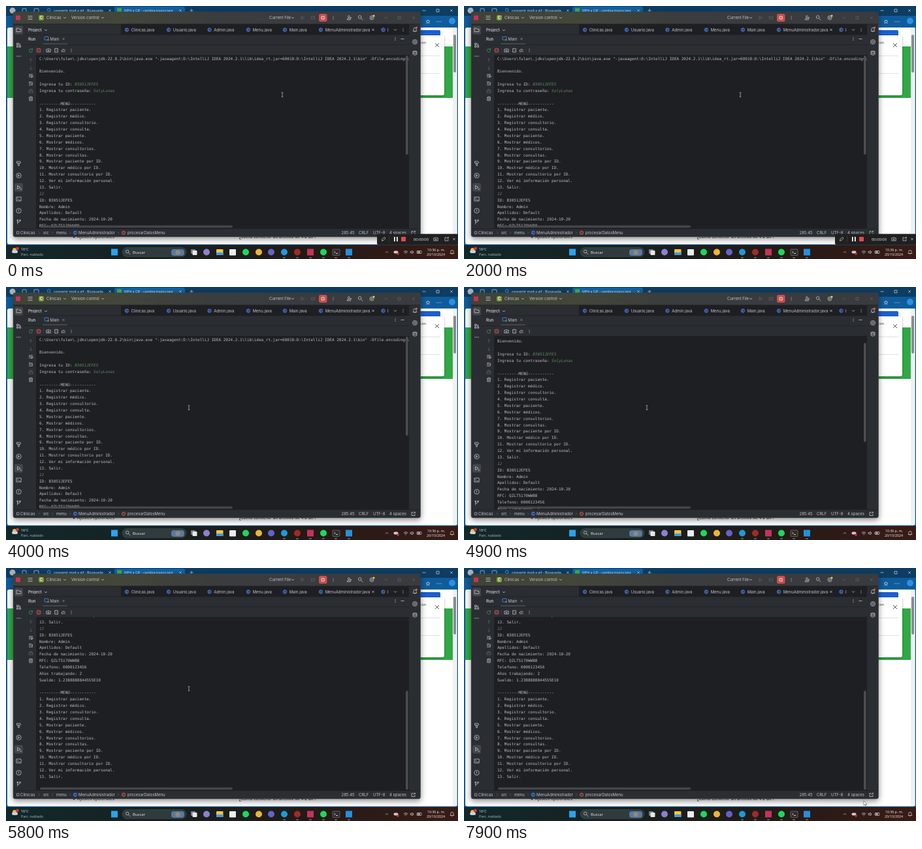
Animation, 692 px wide and 388 px high, one loop 8200 ms. Source, as an HTML page:

```html
<!DOCTYPE html>
<html lang="es">
<head>
<meta charset="utf-8">
<title>Consola</title>
<style>
html, body { margin: 0; width: 100%; height: 100%; overflow: hidden; background: #1e1f22 }
svg { display: block }
text { white-space: pre; font: 6px Inter, sans-serif; fill: #c3c5cb }
.web { font: 5.3px "Open Sans", sans-serif; fill: #eef3f8 }
.mono { font: 6px "DejaVu Sans Mono", monospace; fill: #bcbec4 }
.input { fill: #5b8f60; font-style: italic }
.bold { font-weight: 600 }
</style>
</head>
<body>
<svg id="stage" width="100%" height="100%" viewBox="0 0 692 388"></svg>
<script>
const LOOP = 8200, LINE = 9.87;
const GREY = '#c3c5cb', DIM = '#5f6269', BLUE = '#548af7', RED = '#db5c5c', GREEN = '#57965c';

const rect = (x, y, w, h, fill, r = 0, more = '') =>
  `<rect x="${x}" y="${y}" width="${w}" height="${h}" rx="${r}" fill="${fill}" ${more}/>`;
const dot = (x, y, r, fill) => `<circle cx="${x}" cy="${y}" r="${r}" fill="${fill}"/>`;
const ring = (x, y, r, stroke = GREY) =>
  `<circle cx="${x}" cy="${y}" r="${r}" fill="none" stroke="${stroke}" stroke-width=".8"/>`;
const text = (x, y, s, cls = '', more = '') => `<text x="${x}" y="${y}" class="${cls}" ${more}>${s}</text>`;
// Line icon centred on x, y
const icon = (x, y, d, stroke = GREY, fill = 'none') =>
  `<path transform="translate(${x} ${y})" d="${d}" stroke="${stroke}" fill="${fill}" stroke-width=".8"/>`;

const shape = {
  down: 'M-2-1L0 1L2-1', up: 'M-2 1L0-1L2 1', next: 'M-.8-1.6L.8 0L-.8 1.6',
  close: 'M-1.6-1.6L1.6 1.6M1.6-1.6L-1.6 1.6', minus: 'M-2.5 0H2.5', plus: 'M-2.5 0H2.5M0-2.5V2.5',
  box: 'M-2-2H2V2H-2Z', play: 'M-2-2.7L2.5 0L-2 2.7Z',
  folder: 'M-3.5-2.5H-.8L.4-1.3H3.5V2.7H-3.5Z', menu: 'M-3.5-2.5H3.5M-3.5 0H3.5M-3.5 2.5H3.5',
  search: 'M1-1A2.3 2.3 0 1 1-3.6-1A2.3 2.3 0 1 1 1-1M.4 .7L3.3 3.6',
  camera: 'M-3.2-1.8H-1.5L-.8-2.6H.8L1.5-1.8H3.2V2.4H-3.2ZM-1 .3A1 1 0 1 1 1 .3A1 1 0 1 1-1 .3',
  rerun: 'M2.3-1A2.6 2.6 0 1 0 2.5 1M2.6-2.8V-.8H.6', upArrow: 'M0 2.5V-2.5M-1.7-.8L0-2.5L1.7-.8',
  downArrow: 'M0-2.5V2.5M-1.7.8L0 2.5L1.7.8', wrap: 'M-3-2H3M-3 0H2Q3.5 0 3.5 1T2 2H0M1 1L0 2L1 3M-3 2H-1.5',
  toEnd: 'M-3-2H1M-3 0H0M-3 2.5H3M2-2V1M.8 0L2 1L3.2 0',
  printer: 'M-3-1H3V2H-3ZM-1.7-1V-3H1.7V-1', trash: 'M-3-2H3M-2.2-2V3H2.2V-2M-.9-3H.9M-.7-.5V1.5M.7-.5V1.5',
  tree: 'M-3-3H-.5V-.5H-3ZM.8 1H3V3.2H.8ZM-3 1H-.8V3.2H-3ZM-.5-1.7H2V1',
  hammer: 'M-3-2.7H2L3.4-1L2 0H-3ZM-.9 0V3.8H.9V0', shell: 'M-3.6-3H3.6V3H-3.6ZM-2-1.3L-.7 0L-2 1.3M.3 1.5H2',
  branch: 'M-1.8-2V3.5M2-2Q2 .8-1.8 1M-2.6-3H-1V-1.7H-2.6ZM1.2-3H2.8V-1.7H1.2Z',
  bell: 'M-3 2H3L2.1.8V-1A2.1 2.1 0 0 0-2.1-1V.8ZM-.7 3H.7',
  db: 'M-3-2.2Q0-4.4 3-2.2V2.2Q0 4.4-3 2.2ZM-3-2.2Q0-.2 3-2.2M-3 0Q0 2 3 0',
  person: 'M-1.6-1.6A1.5 1.5 0 1 1 1.4-1.6A1.5 1.5 0 1 1-1.6-1.6M-3 3Q-3 .8 0 .8T2.5 3ZM2 0H4M3-1V1',
  star: 'M0-3L.9-1H3L1.3.4L2 2.6L0 1.3L-2 2.6L-1.3.4L-3-1H-.9Z',
  wifi: 'M-3.2-1Q0-4 3.2-1M-2 .5Q0-1.3 2 .5M-.5 2H.5', sound: 'M-3-1H-1.5L0-2.5V2.5L-1.5 1H-3ZM1.3-1.5Q2.6 0 1.3 1.5',
  pen: 'M-2.6 2.6L-2-.1L1.5-3L3-1.5L.1 2Z', export: 'M0-2.5H-2.5V2.5H2.5V0M0 0L2.8-2.8M1-2.8H2.8V-1'
};
const at = (name, x, y, color, fill) => icon(x, y, shape[name], color, fill);
const dots = (x, y) => [-2, 0, 2].map(d => dot(x, y + d, .6, GREY)).join('');
const javaClass = (x, y) => dot(x, y, 2.9, '#25324d') + ring(x, y, 2.7, BLUE) + icon(x, y, 'M1-1A1.4 1.4 0 1 0 1 1', BLUE);

const browser = () => [
  rect(0, 0, 692, 388, '#0b5c9e'), rect(0, 0, 692, 15, '#0d3d63'),
  rect(166, 1, 108, 15, '#0f62a6', 3), rect(2, 15, 690, 18, '#0f5c9c'),
  dot(10, 7, 4.5, '#aeb4bb'), rect(25, 4, 6, 6, 'none', 1, `stroke="${GREY}" stroke-width=".8"`),
  rect(43, 4, 7, 6, 'none', 1, `stroke="${GREY}" stroke-width=".8"`), at('search', 67, 7, '#4da3ff'),
  text(73, 9, 'convertir mp4 a gif - Búsqueda', 'web'), at('close', 159, 7),
  rect(170, 3.5, 7, 7, '#3fae49'), text(181, 9, 'MP4 a GIF - cambia-trazos.test', 'web'), at('close', 267, 7),
  at('plus', 284, 7), at('minus', 640, 7), at('box', 661, 7), at('close', 682, 7),
  at('star', 646, 24), dot(660, 24, .7, GREY), dot(663, 24, .7, GREY), dot(666, 24, .7, GREY), dot(683, 23, 5, '#2f8fe0'),
  rect(2, 33, 688.5, 332.5, '#fff', 3), rect(2, 62, 682, 79, '#31a846'),
  rect(626, 37, 39, 10, '#1b5fd0', 2), rect(626, 45, 45, 92, '#fff', 3, 'filter="url(#soft)"'),
  text(634, 58, 'con', 'web', 'style="fill:#333"'), icon(660, 60, 'M-3-3L3 3M3-3L-3 3', '#333'),
  rect(634, 76, 31, .8, '#d8d8d8'), rect(634, 103, 31, .8, '#d8d8d8'),
  rect(684, 33, 6.5, 332, '#f1f1f1'), rect(685, 44, 4, 58, '#8b8b8b', 2),
  dot(104, 354, 1.5, '#222'),
  text(109, 356, 'Ajustes opcionales', 'web', 'style="fill:#222;font-size:6.6px"'),
  text(357, 356, '¿Cómo convertir un archivo MP4 a GIF?', 'web', 'style="fill:#222;font-size:6.3px;font-weight:600"')
].join('');

const tabs = [[185, 'Clinicas'], [249, 'Usuario'], [311.5, 'Admin'], [371, 'Menu'], [427, 'Main'], [482, 'MenuAdministrador']];
const ide = () => [
  rect(11, 9, 623.5, 345, '#2b2d30', 3, 'stroke="#45474b" stroke-width=".6" filter="url(#shadow)"'),
  rect(11.3, 9.3, 623, 18.2, 'url(#tint)', 2.5),
  rect(15, 14.5, 7, 7, '#c2345c'), at('menu', 37, 18),
  rect(50, 14, 8, 8, '#7a9a3d', 2), text(54, 20.2, 'C', 'bold', 'text-anchor="middle" style="fill:#fff"'),
  text(62, 20.2, 'Clinicas'), at('down', 90, 18), text(100, 20.2, 'Version control'), at('down', 148, 18),
  text(403, 20.2, 'Current File'), at('down', 439, 18), at('play', 454, 18, DIM),
  ring(470, 18, 2.2, DIM), icon(470, 18, 'M-3.5-2L-2-1M3.5-2L2-1M-3.5 2L-2 1M3.5 2L2 1', DIM),
  rect(479, 12, 12.5, 12, '#c94f4f', 2.5), at('box', 485.2, 18, '#fff'), dots(501, 18),
  at('person', 525, 18), at('search', 543, 18), ring(560, 18, 3), ring(560, 18, 1.1), dot(563, 15, 1.6, '#f2c55c'),
  at('minus', 582, 18, DIM), at('box', 602, 18, DIM), at('close', 624, 18, DIM),
  // Tool window headers and editor tabs
  rect(11, 27.5, 623, .7, '#1e1f22'), rect(176, 28, 441, 16, '#1e1f22'), rect(28, 43.5, 589, .8, '#1e1f22'),
  text(34, 39, 'Project', 'bold'), at('down', 61, 37),
  ...tabs.map(([x, name]) => javaClass(x, 36.5) + text(x + 6.7, 38.7, name + '.java')),
  at('close', 562, 36.5), javaClass(577.5, 36.5), text(584, 38.7, 'I'),
  at('down', 596, 36.5), dots(608, 36.5),
  text(34, 52.5, 'Run', 'bold'), rect(59, 47, 6, 5, 'none', 1, `stroke="${BLUE}" stroke-width=".8"`),
  dot(64.5, 52, 1.3, GREEN), text(67.5, 52.5, 'Main'), at('close', 88, 50.5, '#8a8d93'),
  rect(56, 57.5, 38, 1.2, '#55585e', .6), dots(596, 50.5), at('minus', 607, 50.5),
  rect(28, 59, 589, .6, '#1e1f22'),
  at('rerun', 38, 68, GREEN), rect(47.2, 65.2, 5.6, 5.6, '#5e3838', 1, `stroke="${RED}" stroke-width=".8"`),
  rect(57, 64, .6, 8, '#43454a'), at('camera', 65, 68),
  icon(77, 68, 'M-2.3-2.8H2.3V2.8H-2.3Z'), icon(77, 68, 'M-1 0H1.5', RED),
  icon(88, 68, 'M-2.5 2A2.6 2.6 0 1 1 2.5 0M0 0L2.8 2.5M-2.5 2H.5'), dots(100, 68),
  // Side stripes
  rect(13, 30.5, 13, 13, '#43454a', 2.5), at('folder', 19.5, 36.7), at('tree', 19.5, 60),
  dot(17, 77, .7, GREY), dot(19.5, 77, .7, GREY), dot(22, 77, .7, GREY),
  at('hammer', 19.5, 241), ring(19.5, 260, 3.7), icon(19.5, 260, 'M-1-1.5L1.4 0L-1 1.5Z'),
  rect(13, 271.5, 13, 13, '#43454a', 2.5), at('play', 19.5, 278), dot(22.7, 281, 1.4, GREEN),
  at('shell', 19.5, 296), ring(19.5, 314, 3.7), icon(19.5, 314, 'M0-2V.7M0 1.5V2.3'), at('branch', 19.5, 331),
  at('upArrow', 38, 83, DIM), at('downArrow', 38, 95, DIM), at('wrap', 38, 107), at('toEnd', 38, 118.5),
  at('printer', 38, 131, DIM), at('trash', 38, 142),
  at('bell', 626, 36.5), dot(628.5, 33, 1.5, RED), ring(626, 55, 3.5), ring(626, 55, 1.6), at('db', 626, 72),
  // Status bar
  rect(11, 341, 623, .7, '#1e1f22'), rect(16.5, 346, 3.4, 3.4, 'none', 0, `stroke="${GREY}" stroke-width=".6"`),
  text(22, 349.7, 'Clinicas'), at('next', 51, 347.7, DIM), text(57, 349.7, 'src'), at('next', 71, 347.7, DIM),
  text(77, 349.7, 'menu'), at('next', 98, 347.7, DIM), javaClass(106, 347.7), text(111, 349.7, 'MenuAdministrador'),
  at('next', 172, 347.7, DIM), dot(180, 347.7, 2.8, '#5e3838'), ring(180, 347.7, 2.6, RED),
  text(186, 349.7, 'procesarDatosMenu'), text(513.5, 349.7, '285:45'), text(540, 349.7, 'CRLF'),
  text(562, 349.7, 'UTF-8'), text(587, 349.7, '4 spaces'), at('export', 623.5, 348)
].join('');

const menu = ['---------MENÚ-----------', ...['Registrar paciente', 'Registrar médico', 'Registrar consultorio',
  'Registrar consulta', 'Mostrar paciente', 'Mostrar médicos', 'Mostrar consultorios', 'Mostrar consultas',
  'Mostrar paciente por ID', 'Mostrar médico por ID', 'Mostrar consultorio por ID', 'Ver mi imformación personal',
  'Salir'].map((s, i) => `${i + 1}. ${s}.`)];
// Text after a bar is typed by the user
const output = [
  'C:\\Users\\fulan\\.jdks\\openjdk-22.0.2\\bin\\java.exe "-javaagent:D:\\IntelliJ IDEA 2024.2.1\\lib\\idea_rt.jar=60018:D:\\IntelliJ IDEA 2024.2.1\\bin" -Dfile.encoding=UTF-8',
  '', 'Bienvenido.', '', 'Ingresa tu ID: |B3051JEFES', 'Ingresa tu contraseña: |SolyLunas', '',
  ...menu, '|12', 'ID: B3051JEFES', 'Nombre: Admin', 'Apellidos: Default', 'Fecha de nacimiento: 2024-10-20',
  'RFC: QZLT5170WWB8', 'Telefono: 0000123456', 'Años trabajando: 2', 'Sueldo: 1.2388888844555E10', '', ...menu];
const consoleLine = (s, i) => {
  const [plain, typed = ''] = s.split('|');
  return text(51, 82.5 + i * LINE, `${plain}<tspan class="input">${typed}</tspan>`, 'mono');
};
const consolePane = () => `<g clip-path="url(#pane)">${rect(46, 75, 571, 266, '#1e1f22')}
  <g id="lines">${output.map(consoleLine).join('')}</g></g>` +
  rect(612, 76, 3.6, 152, '#4b4d50', 1.8, 'id="thumb"') + rect(52, 336.5, 295, 3.6, '#4b4d50', 1.8, 'opacity=".85"');

const apps = [[307, '#8f7fd0'], [367, '#1ed760'], [387, '#e8b73a'], [406, '#6264c7'], [426, '#1c9bd8'],
  [446, '#a02a2a'], [466, '#c2345c', 1], [486, '#1ed760'], [525, '#2590dc', 1]];
const taskbar = () => [
  rect(0, 366.5, 692, 21.5, 'url(#desk)'),
  dot(13, 374, 3, '#f2b632'), rect(9, 374.5, 9, 4.5, '#c9d3dc', 2.2), dot(17.5, 372, 2.4, '#d13438'),
  text(23, 375.4, '16°C', 'web'), text(23, 382.7, 'Parc. nublado', 'web', 'style="fill:#b4bac0"'),
  rect(161, 372.5, 10, 10, '#29a3ef'),
  rect(178, 370.5, 98, 14, '#303b3d', 7, 'stroke="#435053" stroke-width=".5"'),
  at('search', 187, 377.5), text(194, 379.7, 'Buscar', 'web', 'style="font-size:6px"'),
  rect(253, 373, 20, 10, '#597a9c', 4), dot(263, 378, 3.6, '#8f8a80'),
  rect(283, 373, 7, 7, '#777d82', 1), rect(285.5, 375, 7, 7, '#e6e8ea', 1),
  rect(322, 373, 10.5, 9, '#f5c443', 1), rect(322, 378, 10.5, 4, '#3f9ce0', 1), rect(342, 373, 10, 9.5, '#e9eef2', 1),
  ...apps.map(([x, c, square]) => square ? rect(x - 5, 372.5, 10, 10, c) : dot(x, 377.5, 5, c)),
  rect(500, 373, 11, 9.5, '#2c2c2c', 1, 'stroke="#888" stroke-width=".6"'), icon(504, 377.5, 'M-1.5-1.5L0 0L-1.5 1.5M1 2H4', '#fff'),
  ...[426, 446, 466, 486, 505, 525].map(x => rect(x - 2, 385.5, 4, 1, '#8fa3b0', .5)),
  at('up', 583, 377.5), rect(593.5, 375.5, 7, 4, '#c9ced3', 2), dot(600, 380, 1.8, '#d13438'),
  at('wifi', 612, 378), at('sound', 622, 377.5), rect(629, 375.5, 7, 4, 'none', 1, `stroke="${GREY}" stroke-width=".8"`),
  rect(630, 376.5, 4, 2, GREY), text(672, 375.6, '10:36 p. m.', 'web', 'text-anchor="end"'),
  text(672, 382.8, '20/10/2024', 'web', 'text-anchor="end"'), at('bell', 683, 377.5)
].join('');

const recorder = () => `<g id="recorder">${[
  rect(568, 349.5, 124, 16.5, '#202020', 2), at('pen', 578, 357.5), rect(586.5, 352, .6, 11, '#444'),
  rect(594, 354, 1.7, 7, '#fff'), rect(598, 354, 1.7, 7, '#fff'), rect(605, 354, 7, 7, '#e5484d', 1),
  text(624, 359.6, '00:00:00', 'web', 'style="font-size:5.8px"'), at('camera', 658, 357.5),
  at('export', 674.5, 357.5), at('close', 686, 357.5)].join('')}</g>`;

const cursors = `<path id="beam" d="M-1.3-3.2H1.3M0-3.2V3.2M-1.3 3.2H1.3" stroke="#c8c8c8" stroke-width=".7"/>
  <path id="arrow" d="M0 0V7L1.7 5.5L2.8 8L3.9 7.5L2.8 5.1H5Z" fill="#fff" stroke="#000" stroke-width=".4"/>`;

const gradient = (id, ...colors) => `<linearGradient id="${id}">${colors.map((c, i) =>
  `<stop offset="${i / (colors.length - 1)}" stop-color="${c}"/>`).join('')}</linearGradient>`;
const shadow = (id, dy, blur, opacity) => `<filter id="${id}" x="-20%" y="-20%" width="140%" height="140%">
  <feDropShadow dx="0" dy="${dy}" stdDeviation="${blur}" flood-opacity="${opacity}"/></filter>`;

const stage = document.getElementById('stage');
stage.innerHTML = `<defs><clipPath id="pane"><rect x="46" y="75" width="571" height="266"/></clipPath>
  ${gradient('tint', '#3e4239', '#43473a', '#3a3c3d', '#393b3e', '#393b3e')}
  ${gradient('desk', '#12282b', '#17211f', '#221a17', '#3a1b14')}
  ${shadow('shadow', 3, 5, .45)}${shadow('soft', 1, 1.5, .35)}</defs>` +
  browser() + ide() + consolePane() + taskbar() + recorder() + cursors;
const [lines, thumb, bar, beam, arrow] = ['lines', 'thumb', 'recorder', 'beam', 'arrow'].map(id => document.getElementById(id));

// Linear interpolation through [time, value] keys
function track(t, keys) {
  const i = keys.findIndex(([time]) => time >= t);
  if (i < 0) return keys[keys.length - 1][1];
  if (i === 0) return keys[0][1];
  const [[t0, v0], [t1, v1]] = [keys[i - 1], keys[i]];
  return v0 + (v1 - v0) * (t - t0) / (t1 - t0);
}
const scrollKeys = [[4700, 0], [4900, 17], [5300, 80], [5500, 195]];
const xKeys = [[3500, 423], [4000, 280], [6900, 280], [7300, 560], [7600, 677], [7800, 613], [7900, 612]];
const yKeys = [[3500, 136], [4000, 185], [6900, 185], [7300, 50], [7600, 377], [7800, 358], [7900, 357]];

function draw(now) {
  const t = Math.floor(Math.max(0, now - start) % LOOP / 100) * 100;
  const scroll = track(t, scrollKeys), x = track(t, xKeys), y = track(t, yKeys);
  lines.setAttribute('transform', `translate(0 ${-scroll})`);
  thumb.setAttribute('y', 76 + scroll * .575);
  bar.setAttribute('opacity', track(t, [[2600, 1], [3000, 0]]));
  const overText = x > 46 && x < 612 && y > 75 && y < 336;
  beam.setAttribute('visibility', overText ? 'visible' : 'hidden');
  arrow.setAttribute('visibility', overText ? 'hidden' : 'visible');
  for (const c of [beam, arrow]) c.setAttribute('transform', `translate(${x} ${y})`);
  requestAnimationFrame(draw);
}
const start = performance.now();
draw(start);
</script>
</body>
</html>
```
